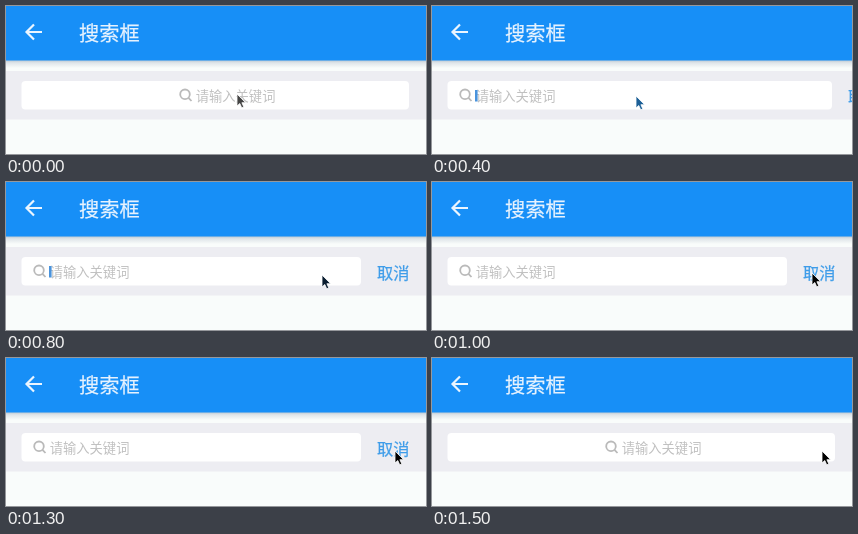
Write an HTML page that moves like this. It is 420 px wide and 148 px high and loops after 1600 ms.

```html
<!DOCTYPE html>
<html lang="zh-CN">
<head>
<meta charset="utf-8">
<style>
  html, body { margin: 0; width: 100%; height: 100%; overflow: hidden; background: #f9fcfb; }
  svg { display: block; width: 420px; height: 148px; }
  text { font-family: "Noto Sans CJK SC", "Noto Sans CJK", sans-serif; }
</style>
</head>
<body>
<svg viewBox="0 0 420 148">
  <defs>
    <linearGradient id="shade" x2="0" y2="1">
      <stop stop-color="#b9c6d2"/>
      <stop offset=".35" stop-color="#dfe5e9"/>
      <stop offset="1" stop-color="#f9fcfb"/>
    </linearGradient>
  </defs>
  <rect width="420" height="148" fill="#f9fcfb"/>
  <rect y="54" width="420" height="8" fill="url(#shade)"/>
  <rect width="420" height="54.5" fill="#178ff7"/>
  <path d="M36 26H21M28 18.5L20.5 26L28 33.5" fill="none" stroke="#eaf5ff" stroke-width="2.2"/>
  <text x="73" y="34.9" font-size="20.2" fill="#e6f2fe" stroke="#e6f2fe" stroke-width=".25">搜索框</text>

  <rect y="65" width="420" height="48.5" fill="#ededf2"/>
  <rect id="field" x="15.5" y="75" height="28.5" rx="4" fill="#fff"/>
  <g id="hint">
    <circle cx="179" cy="88.3" r="4.8" fill="none" stroke="#bababa" stroke-width="1.8"/>
    <path d="M182.5 91.8L185.5 95" stroke="#bababa" stroke-width="1.8"/>
    <text x="189.7" y="94.9" font-size="13.3" fill="#c0c0c0">请输入关键词</text>
  </g>
  <rect id="caret" x="43" y="84" width="2.6" height="11.5" fill="#4a93dc"/>
  <circle id="ring" cx="389" cy="92" r="20" fill="#fff" fill-opacity=".4" stroke="#111" stroke-width="1.5"/>
  <text id="cancel" y="96.5" font-size="16.2" fill="#3f9de9" stroke="#3f9de9" stroke-width=".25">取消</text>
  <path id="pointer" d="M0 0V12L2.8 9.5L4.7 13.8L6.8 12.9L4.9 8.7H8.6Z" stroke="#fff" stroke-width=".8"/>
</svg>
<script>
  const LOOP = 1600, STEP = 100;
  const el = id => document.getElementById(id);
  const show = (id, on) => el(id).style.display = on ? '' : 'none';

  // time, x, y, fill
  const moves = [
    [0, 231, 88, '#444'], [100, 218, 89, '#222'], [200, 204, 90, '#111'],
    [300, 204, 90, '#12609c'], [400, 204, 90, '#1c5f96'], [500, 208, 90, '#174a73'],
    [600, 235, 91, '#0b2c48'], [800, 316, 93, '#0a1d30'], [900, 352, 92, '#060f18'],
    [1000, 380, 91, '#000'], [1100, 392, 90, '#000'], [1200, 390, 92, '#000'],
    [1300, 389, 93, '#000'], [1500, 390, 93, '#000']
  ];
  const widths = [[0, 403], [400, 400], [500, 372], [600, 355], [1500, 403]];
  const at = (keys, t) => keys.filter(k => k[0] <= t).pop();

  function draw(now) {
    const t = Math.floor(now % LOOP / STEP) * STEP;
    const open = t >= 400 && t < 1500;
    const right = at(widths, t)[1];
    const [, x, y, fill] = at(moves, t);

    el('field').setAttribute('width', right - 15.5);
    el('hint').setAttribute('transform', `translate(${open ? -146 : 0} 0)`);
    el('cancel').setAttribute('x', right + 16);
    show('cancel', open);
    show('caret', open && (t - 400) % 1000 < 500);
    show('ring', t === 1400);
    el('pointer').setAttribute('transform', `translate(${x} ${y})`);
    el('pointer').setAttribute('fill', fill);
    requestAnimationFrame(() => draw(performance.now() - start));
  }
  const start = performance.now();
  draw(0);
</script>
</body>
</html>
```
